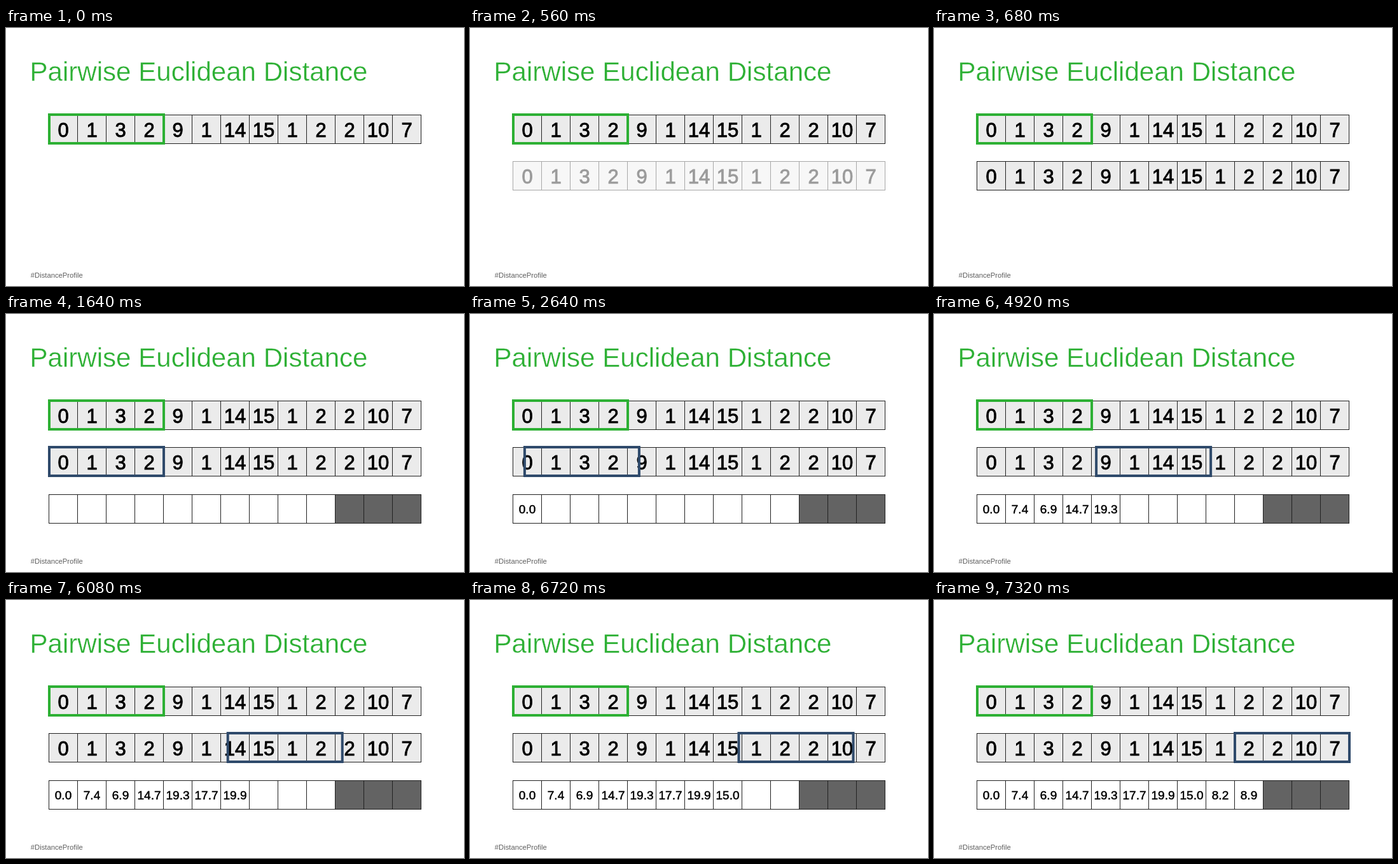
These frames come from a looping animation (720 by 405 pixels, 7.8 s). An HTML page:

```html
<!DOCTYPE html>
<html lang="en">
<head>
<meta charset="utf-8">
<title>Pairwise Euclidean Distance</title>
<style>
  html, body { margin: 0; width: 100%; height: 100%; overflow: hidden; background: #fff; }
  svg { display: block; width: 720px; height: 405px; }
  text { font-family: "Liberation Sans", Arial, sans-serif; }
  .title { font-size: 42.1px; fill: #2db034; stroke: #fff; stroke-width: .4px; }
  .tag { font-size: 11.25px; fill: #5e5e5e; }
  .num, .dist { text-anchor: middle; fill: #000; stroke: #000; }
  .num { font-size: 31px; stroke-width: .9px; }
  .dist { font-size: 19px; stroke-width: .5px; }
  .cell { stroke: #222; stroke-width: 1px; }
  .frame { fill: none; stroke-width: 4px; }
</style>
</head>
<body>
<svg id="stage" viewBox="0 0 720 405">
  <rect width="720" height="405" fill="#fff"/>
  <text class="title" x="37.4" y="83">Pairwise Euclidean Distance</text>
  <text class="tag" x="38.8" y="392">#DistanceProfile</text>
</svg>
<script>
const LOOP = 7800, TICK = 40;
const CELL = 45, LEFT = 67.5, WINDOW = 4;
const FADE_START = 490, FADE_TIME = 180;
const PROFILE_AT = 1160, WINDOW_AT = 1640, FIRST_DIST_AT = 2160;
const MOVE_START = 2600.2, MOVE_EVERY = 576, MOVE_TIME = 100;

const series = [0, 1, 3, 2, 9, 1, 14, 15, 1, 2, 2, 10, 7];
const query = series.slice(0, WINDOW);
const count = series.length - WINDOW + 1;
const stage = document.getElementById("stage");

function add(parent, tag, attrs, text) {
  const node = document.createElementNS("http://www.w3.org/2000/svg", tag);
  for (const name in attrs) node.setAttribute(name, attrs[name]);
  if (text !== undefined) node.textContent = text;
  parent.appendChild(node);
  return node;
}

function addCell(parent, i, y, fill) {
  add(parent, "rect", { class: "cell", x: LEFT + i * CELL, y, width: CELL, height: CELL, fill });
}

function addLabel(parent, i, y, kind, text) {
  return add(parent, "text", { class: kind, x: LEFT + (i + .5) * CELL, y }, text);
}

function addSeries(y) {
  const row = add(stage, "g");
  series.forEach((value, i) => {
    addCell(row, i, y, "#ebebeb");
    addLabel(row, i, y + 34, "num", value);
  });
  return row;
}

function addFrame(y, stroke) {
  return add(stage, "rect", { class: "frame", x: 68, y, width: WINDOW * CELL, height: CELL, stroke });
}

function distance(start) {
  return Math.hypot(...query.map((q, j) => q - series[start + j])).toFixed(1);
}

const clamp = v => Math.max(0, Math.min(1, v));
const show = (node, on) => node.setAttribute("visibility", on ? "visible" : "hidden");

addSeries(136.5);
addFrame(136, "#2db034");
const copy = addSeries(209.5);
const slider = addFrame(209, "#2f4a6b");

const profile = add(stage, "g");
series.forEach((_, i) => addCell(profile, i, 283.5, i < count ? "#fff" : "#636363"));
const dists = Array.from({ length: count }, (_, i) =>
  addLabel(stage, i, 313, "dist", distance(i)));

// Progress of the slide that brings the window to position i
const slide = (t, i) => clamp((t - MOVE_START - (i - 1) * MOVE_EVERY) / MOVE_TIME);

function draw(time) {
  const t = Math.floor((time % LOOP) / TICK) * TICK;
  copy.setAttribute("opacity", clamp((t - FADE_START) / FADE_TIME));
  show(profile, t >= PROFILE_AT);
  show(slider, t >= WINDOW_AT);

  let shift = 0;
  dists.forEach((label, i) => {
    const p = i ? slide(t, i) : 0;
    shift += p;
    show(label, i ? p === 1 : t >= FIRST_DIST_AT);
  });
  slider.setAttribute("x", 68 + shift * CELL);
}

const begin = performance.now();
function tick() {
  draw(performance.now() - begin);
  requestAnimationFrame(tick);
}
tick();
</script>
</body>
</html>
```
